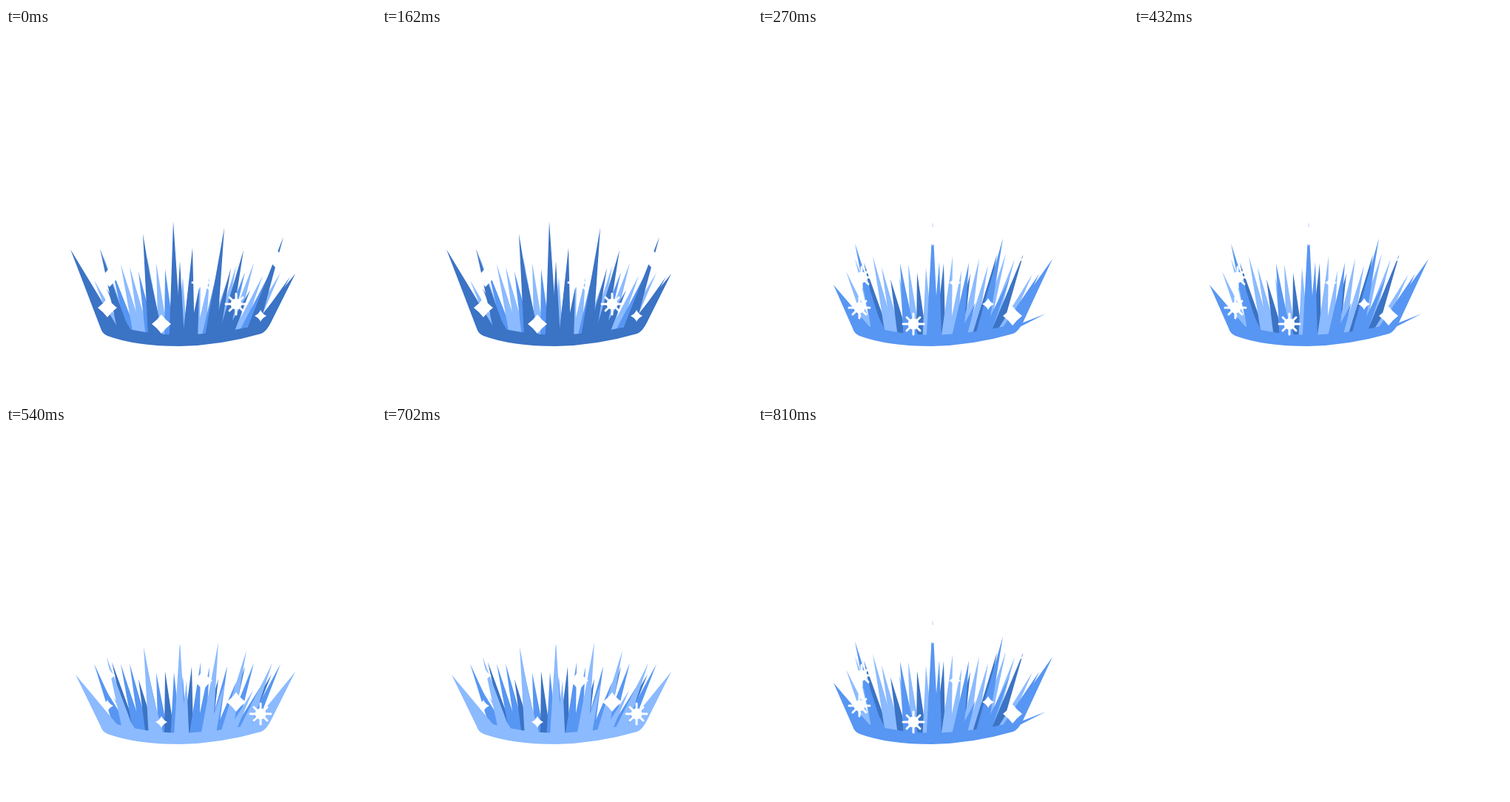
An HTML page that plays this animation: 500 px wide and 500 px high, repeating every 1.08 s.

```html
<!DOCTYPE html>
<html lang="en">
<head>
<meta charset="utf-8">
<title>Ice crystals</title>
<style>
  html, body { margin: 0; width: 100%; height: 100%; overflow: hidden; background: #fff; }
  svg { display: block; width: 100vw; height: 100vh; }
  .pose { opacity: 0; filter: blur(.6px); animation: 1080ms step-end infinite; }
  #dark { animation-name: dark; }
  #mid { animation-name: mid; }
  #light { animation-name: light; }
  @keyframes dark { 0% { opacity: 1 } 25%, 100% { opacity: 0 } }
  @keyframes mid { 0% { opacity: 0 } 25% { opacity: 1 } 50% { opacity: 0 } 75%, 100% { opacity: 1 } }
  @keyframes light { 0% { opacity: 0 } 50% { opacity: 1 } 75%, 100% { opacity: 0 } }
</style>
</head>
<body>
<svg viewBox="0 0 500 500">
  <defs>
    <path id="small" fill="#fff" d="M0-8Q2-3 8 0Q2 3 0 8Q-2 3-8 0Q-2-3 0-8Z"/>
    <path id="large" fill="#fff" d="M0-13Q5-6 13 0Q5 6 0 13Q-5 6-13 0Q-5-6 0-13Z"/>
    <g id="burst" fill="#fff" stroke="#fff" stroke-width="3" stroke-linecap="round">
      <path d="M0-14V14M-14 0H14M-9-9L9 9M9-9L-9 9"/>
      <circle r="6"/>
    </g>
  </defs>
</svg>
<script>
  const DARK = '#3b73c5', MID = '#5796f3', LIGHT = '#8bbaff';
  const NS = 'http://www.w3.org/2000/svg';
  const KINDS = ['small', 'large', 'burst'];

  // Outer tips frame the crown; the inner tips are its tallest crystals.
  const poses = [
    { id: 'dark', front: DARK, rear: LIGHT, accent: MID, crest: 304, outer: ['87 299', '391 332'],
      tips: '127,298 185,278 226,261 252,297 295,270 321,300 375,282' },
    { id: 'mid', front: MID, rear: LIGHT, accent: DARK, crest: 300, outer: ['102 347', '398 312'],
      tips: '131,291 192,318 236,262 285,317 331,284 380,332' },
    { id: 'light', front: LIGHT, rear: MID, accent: DARK, crest: 318, outer: ['94 336', '391 332'],
      tips: '136,312 186,298 235,290 287,292 325,303 360,320' }
  ];

  // x, y and the first kind; every glint steps through the kinds.
  const glints = [
    [137, 378, 1], [210, 400, 1], [311, 373, 2], [344, 389, 0],
    [266, 344, 2], [140, 337, 1], [366, 313, 1], [236, 281, 0]
  ];

  const random = n => {
    const v = Math.sin(n * 12.9898) * 43758.5453;
    return v - Math.floor(v);
  };

  function add(parent, tag, attrs) {
    const node = document.createElementNS(NS, tag);
    for (const key in attrs) node.setAttribute(key, attrs[key]);
    return parent.appendChild(node);
  }

  // The foot of each spike fans in towards the middle.
  function spike(group, fill, x, y, half) {
    const foot = 235 + (x - 235) * .7;
    const floor = 418 - ((foot - 235) / 100) ** 2 * 10;
    add(group, 'path', { fill, d: `M${x} ${y}L${foot + half} ${floor}H${foot - half}Z` });
  }

  function rearFan(group, pose, seed) {
    for (let i = 0; i < 22; i++) {
      const accent = i % 3 === 2;
      const y = pose.crest + 40 * random(i + seed * 30 + 1);
      spike(group, accent ? pose.accent : pose.rear, 119 + i * 12, y, 7);
    }
  }

  function frontFan(group, pose) {
    for (const tip of pose.tips.split(' ')) {
      const [x, y] = tip.split(',').map(Number);
      spike(group, pose.front, x, y, 8);
      spike(group, pose.front, x + 9, y + 54, 6);
    }
  }

  function base(group, fill, [left, right]) {
    add(group, 'path', { fill, d: `M${left}L150 403Q190 414 235 415Q290 413 333 403L${right}
      L358 398Q352 410 345 413Q290 429 235 430Q175 430 137 416Q130 413 128 406Z` });
  }

  poses.forEach((pose, step) => {
    const group = add(document.querySelector('svg'), 'g', { id: pose.id, class: 'pose' });
    rearFan(group, pose, step);
    frontFan(group, pose);
    base(group, pose.front, pose.outer);
    for (const [x, y, first] of glints) {
      add(group, 'use', { href: '#' + KINDS[(first + step) % 3], x, y });
    }
  });
</script>
</body>
</html>
```
